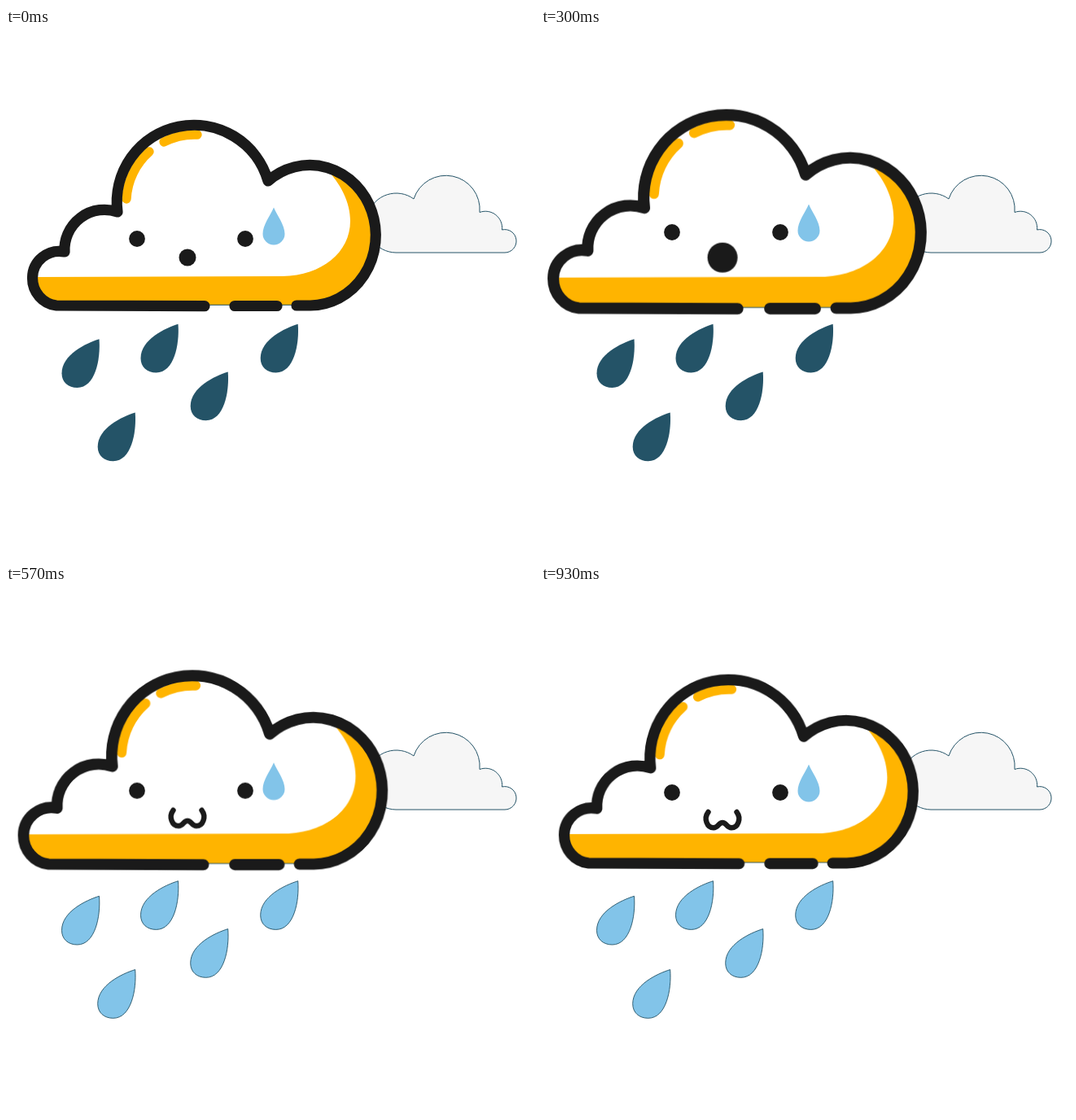
Animation of 650 by 650 pixels, one loop 1200 ms. Source, as an HTML page:

```html
<!DOCTYPE html>
<html lang="en">
<head>
<meta charset="utf-8">
<title>Rain cloud</title>
<style>
  html, body { margin: 0; width: 100%; height: 100%; overflow: hidden; background: #fff; }
  svg { display: block; width: 100%; height: 100%; }

  .ink { fill: none; stroke: #1a1a1a; stroke-width: 13.2; stroke-linecap: round; stroke-linejoin: round; }
  .dot { fill: #1a1a1a; }
  .sun { fill: #ffb400; }
  .shine { fill: none; stroke: #ffb400; stroke-width: 11.4; stroke-linecap: round; }
  .edge { fill: none; stroke: #245367; stroke-width: 1; }
  .tear { fill: #82c4e9; }

  .cloud, .face, .tear, .gasp, .smile, .rain {
    animation: 1200ms infinite;
  }
  .cloud { animation-name: swell; transform-origin: 278px 296px; }
  .face  { animation-name: lift; }
  .tear  { animation-name: bob; }
  .gasp  { animation-name: gasp; transform-origin: 223px 282px; }
  .smile { animation-name: smile; animation-timing-function: step-end; }
  .rain  { animation-name: tint; animation-timing-function: step-end; }

  /* every move advances in 30 ms ticks */
  @keyframes swell {
    0%    { transform: scale(1); animation-timing-function: steps(10); }
    25%   { transform: scale(1.071); animation-timing-function: steps(6); }
    40%   { transform: scale(1.0535); animation-timing-function: steps(5); }
    52.5% { transform: scale(1.0395); animation-timing-function: steps(5); }
    65%   { transform: scale(1.0265); animation-timing-function: steps(5); }
    77.5%, 100% { transform: scale(1.0165); }
  }
  @keyframes lift {
    0%  { transform: translateY(0); animation-timing-function: steps(10); }
    25% { transform: translateY(-8px); animation-timing-function: steps(21); }
    77.5%, 100% { transform: translateY(-4px); }
  }
  @keyframes bob {
    0%  { transform: translateY(0); animation-timing-function: steps(10); }
    25% { transform: translateY(-4px); animation-timing-function: steps(21); }
    77.5%, 100% { transform: translateY(0); }
  }
  @keyframes gasp {
    0%  { transform: scale(1); opacity: 1; animation-timing-function: steps(10); }
    25% { transform: scale(1.76); opacity: 1; animation-timing-function: step-end; }
    27.5%, 100% { transform: scale(1.76); opacity: 0; }
  }
  @keyframes smile {
    0% { opacity: 0; }
    27.5%, 100% { opacity: 1; }
  }
  @keyframes tint {
    0% { fill: #245367; stroke: transparent; }
    27.5%, 100% { fill: #82c4e9; stroke: #245367; }
  }
</style>
</head>
<body>
<svg viewBox="0 0 650 650">
  <defs>
    <path id="drop" d="M0 0C-16 5 -46 19 -46 42C-46 53 -38 59.7 -27 59.7C-5 59.7 2 25 0 0Z"/>
  </defs>

  <path d="M479 276A36.5 36.5 0 1 1 501 210A41.6 41.6 0 0 1 582 226.5A20.5 20.5 0 0 1 609.5 248A14.2 14.2 0 1 1 613 276Z"
        fill="#f6f6f6" stroke="#245367"/>

  <g class="cloud">
    <path fill="#fff" d="M62 340.5A33 34 0 0 1 32.5 307A33 33 0 0 1 72 275A49 49 0 0 1 137 226A94.7 94.7 0 0 1 322 188A81 86.25 0 1 1 374 340.5Z"/>
    <path class="sun" d="M32.5 306L340 305C388 304 423 276 423 237C423 215 412 191 391 170.4A81 86.25 0 0 1 374 340.5H62A33 34 0 0 1 32.5 306Z"/>
    <path class="edge" d="M244 340.3H360"/>
    <path class="shine" d="M148 210A82.5 82.5 0 0 1 176 152M194 140A82.5 82.5 0 0 1 235 131"/>
    <path class="ink" d="M244 341.7L62 341A33 34 0 0 1 32.5 307A33 33 0 0 1 72 275A49 49 0 0 1 137 226A94.7 94.7 0 0 1 322 188A81 86.25 0 1 1 374 341H357M281 341.5H333"/>
  </g>

  <g class="face">
    <circle class="dot" cx="161" cy="259" r="9.9"/>
    <circle class="dot" cx="294" cy="259" r="9.9"/>
    <path class="smile" fill="none" stroke="#1a1a1a" stroke-width="6.4" stroke-linecap="round"
          d="M205.5 283C199.5 291 204 302.3 212 302.3C218 302.3 218 296 223 296C228 296 228 302.3 234 302.3C242 302.3 246.5 291 240.5 283"/>
  </g>
  <circle class="dot gasp" cx="223" cy="282" r="10.5"/>
  <path class="tear" d="M329 220.5C333.5 231 342.5 242 342.5 253A13.5 13.5 0 0 1 315.5 253C315.5 242 324.5 231 329 220.5Z"/>

  <g class="rain" stroke-width=".9">
    <use href="#drop" x="114.5" y="382.3"/>
    <use href="#drop" x="211.5" y="363.7"/>
    <use href="#drop" x="358.7" y="363.7"/>
    <use href="#drop" x="272.7" y="422.6"/>
    <use href="#drop" x="158.7" y="472.6"/>
  </g>
</svg>
</body>
</html>
```
